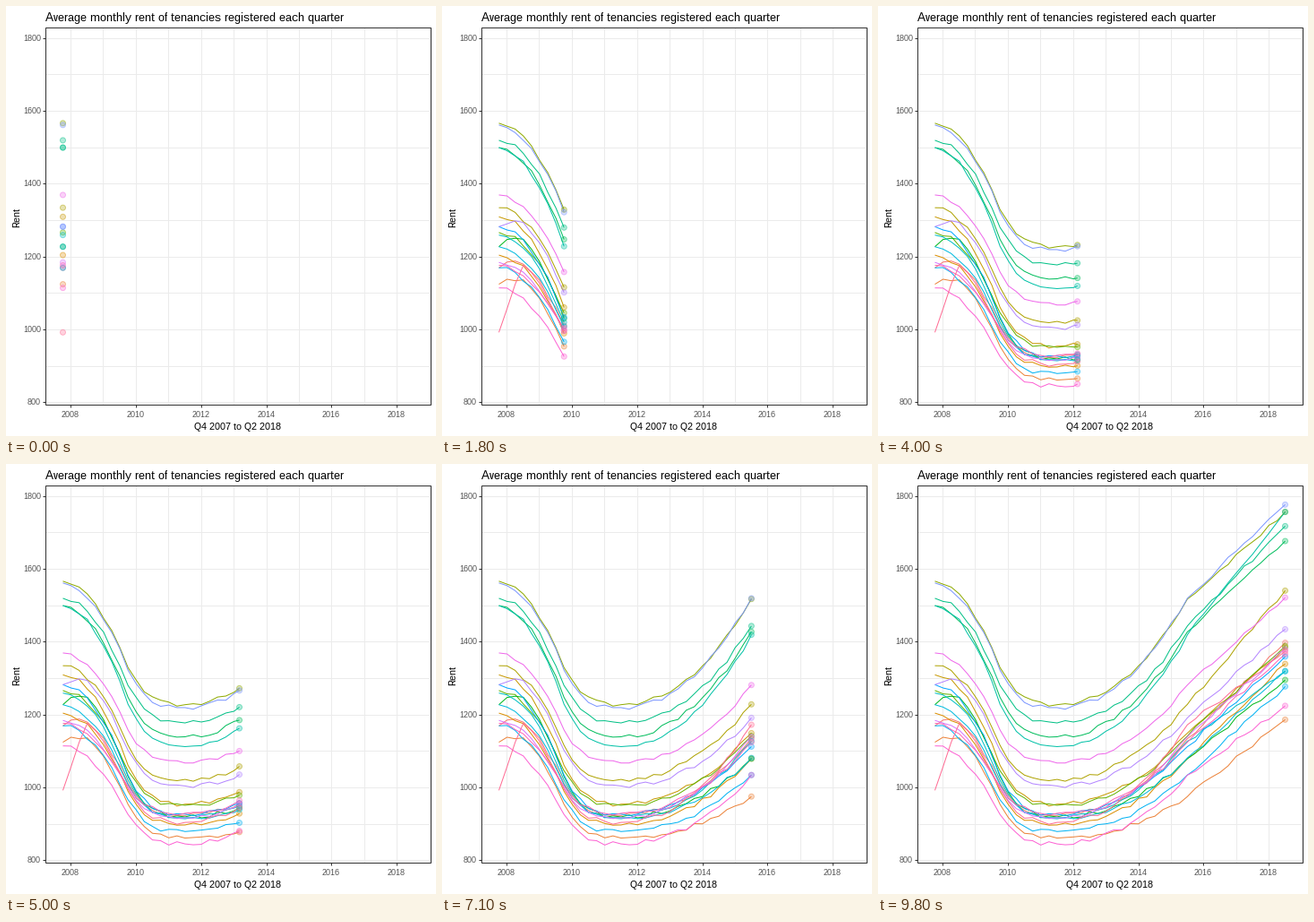
Write a matplotlib script that moves like this. It is 480 px wide and 480 px high and loops after 9.9 s.

```python
import matplotlib.pyplot as plt
import numpy as np
from matplotlib.animation import FuncAnimation
from matplotlib.collections import LineCollection
from matplotlib.patches import Rectangle

plt.rcParams.update({
    "font.family": ["Liberation Sans", "DejaVu Sans"],
    "text.hinting": "native",
    "text.hinting_factor": 1,
})

SIZE, FRAMES, QUARTERS = 480, 99, 43
LEFT, RIGHT, TOP, BOTTOM = 44.5, 474.5, 24.5, 445.5
GRID, INK, TICK = "#EBEBEB", "#333333", "#4D4D4D"
STEPS = np.arange(QUARTERS + 1)

# Each quarter lands on a whole frame; time runs evenly in between.
ARRIVALS = np.minimum(np.round(STEPS * FRAMES / QUARTERS), FRAMES - 1)

# Shared course of all rents: plunge, level off, recover, climb.
TURNS = [0, 8, 15, 31, QUARTERS]
EASES = [
    lambda p: p ** 1.9,
    lambda p: 1 - (1 - p) ** 3,
    lambda p: p ** 2.1,
    lambda p: p,
]
rng = np.random.default_rng(7)


def quarter_x(q):
    return 63.5 + 391 / QUARTERS * q


def year_x(year):
    return 72.5 + 36.43 * (year - 2008)


def rent_y(rent):
    return 36 + 0.4068 * (1800 - rent)


def hue_color(hue):
    """RGB of a hue at luminance 65 and chroma 100 in polar LUV."""
    lum, chroma = 65, 100
    angle = np.radians(hue)
    u = chroma * np.cos(angle) / (13 * lum) + 0.1978
    v = chroma * np.sin(angle) / (13 * lum) + 0.4683
    y = ((lum + 16) / 116) ** 3
    x = 9 * y * u / (4 * v)
    z = y * (12 - 3 * u - 20 * v) / (4 * v)
    rgb = np.array([3.2406 * x - 1.5372 * y - 0.4986 * z,
                    -0.9689 * x + 1.8758 * y + 0.0415 * z,
                    0.0557 * x - 0.2040 * y + 1.0570 * z])
    rgb = np.clip(rgb, 0, 1)
    return np.where(rgb > 0.00304, 1.055 * rgb ** (1 / 2.4) - 0.055,
                    12.92 * rgb).clip(0, 1)


curves = []


def add(start, low, mid, end, dip=0):
    """One series from four key rents; dip lowers its first months."""
    keys = [start, low + 0.3 * (start - low), low, mid, end]
    curve = np.zeros(len(STEPS))
    for i, ease in enumerate(EASES):
        a, b = TURNS[i], TURNS[i + 1]
        p = np.linspace(0, 1, b - a + 1)
        curve[a:b + 1] = keys[i] + (keys[i + 1] - keys[i]) * ease(p)
    wobble = rng.uniform(-6, 6, len(STEPS))
    wobble[TURNS] = 0
    curve += wobble - dip * np.clip(1 - STEPS / 3, 0, 1)
    curves.append(rent_y(curve))


# In order of hue, from red around to pink.
add(1215, 924, 1135, 1398, dip=45)
add(1170, 862, 976, 1187, dip=45)
add(1205, 898, 1080, 1340)
add(1310, 955, 1150, 1385)
add(1335, 1023, 1229, 1541)
add(1567, 1228, 1518, 1757)
add(1267, 952, 1142, 1389)
add(1290, 920, 1080, 1296, dip=62)
add(1500, 1140, 1428, 1677)
add(1520, 1178, 1444, 1718)
add(1500, 1113, 1420, 1757)
add(1260, 918, 1128, 1320)
add(1228, 915, 1082, 1320)
add(1170, 880, 1035, 1278)
add(1283, 928, 1113, 1360)
add(1562, 1220, 1520, 1777)
add(1330, 1005, 1192, 1435, dip=47)
add(1185, 918, 1140, 1380)
add(1370, 1068, 1282, 1522)
add(1115, 846, 1035, 1225)
add(1177, 930, 1125, 1367)
add(1210, 905, 1173, 1375, dip=217)

colors = [hue_color(15 + 360 * i / len(curves)) for i in range(len(curves))]

fig = plt.figure(figsize=(SIZE / 72, SIZE / 72), dpi=72, facecolor="white")
ax = fig.add_axes([0, 0, 1, 1])
ax.set(xlim=(0, SIZE), ylim=(SIZE, 0))
ax.axis("off")


def stroke(xs, ys, color):
    ax.plot(xs, ys, color=color, lw=1, snap=False, zorder=1,
            solid_capstyle="butt")


def center(v):
    return np.floor(v) + 0.5


def label(x, y, text, size, color="black", ha="left", **options):
    options.setdefault("va", "baseline")
    ax.text(x, y, text, size=size, color=color, ha=ha, **options)


for year in range(2008, 2020):
    x = center(year_x(year))
    stroke([x, x], [TOP, BOTTOM], GRID)
    if year % 2 == 0:
        stroke([x, x], [BOTTOM, BOTTOM + 3], INK)
        label(x - 0.5, 459, str(year), 9, TICK, "center")

for rent in range(800, 1900, 100):
    y = center(rent_y(rent))
    stroke([LEFT, RIGHT], [y, y], GRID)
    if rent % 200 == 0:
        stroke([LEFT - 3, LEFT], [y, y], INK)
        label(39, y + 2.5, str(rent), 9, TICK, "right")

ax.add_patch(Rectangle((LEFT, TOP), RIGHT - LEFT, BOTTOM - TOP, fill=False,
                       ec=INK, lw=1, snap=False, zorder=5))
label(44, 17, "Average monthly rent of tenancies registered each quarter", 13)
label(258.7, 473, "Q4 2007 to Q2 2018", 11, ha="center")
label(12, 236, "Rent", 11, ha="center", va="center", rotation=90)

lines = LineCollection([], colors=colors, linewidths=1, zorder=3)
ax.add_collection(lines)
dots = ax.scatter(np.zeros(len(curves)), np.zeros(len(curves)), s=6 ** 2,
                  facecolors=[(*c, 0.3) for c in colors],
                  edgecolors=[(*c, 0.45) for c in colors],
                  linewidths=1, zorder=4)


def draw(frame):
    now = np.interp(frame, ARRIVALS, STEPS)
    path = np.append(STEPS[STEPS < now], now)
    xs = quarter_x(path)
    trails = [np.column_stack([xs, np.interp(path, STEPS, c)]) for c in curves]
    lines.set_segments(trails if frame else [])
    dots.set_offsets([trail[-1] for trail in trails])
    return lines, dots


anim = FuncAnimation(fig, draw, frames=FRAMES, interval=100, repeat=True,
                     repeat_delay=0)
plt.show()
```
